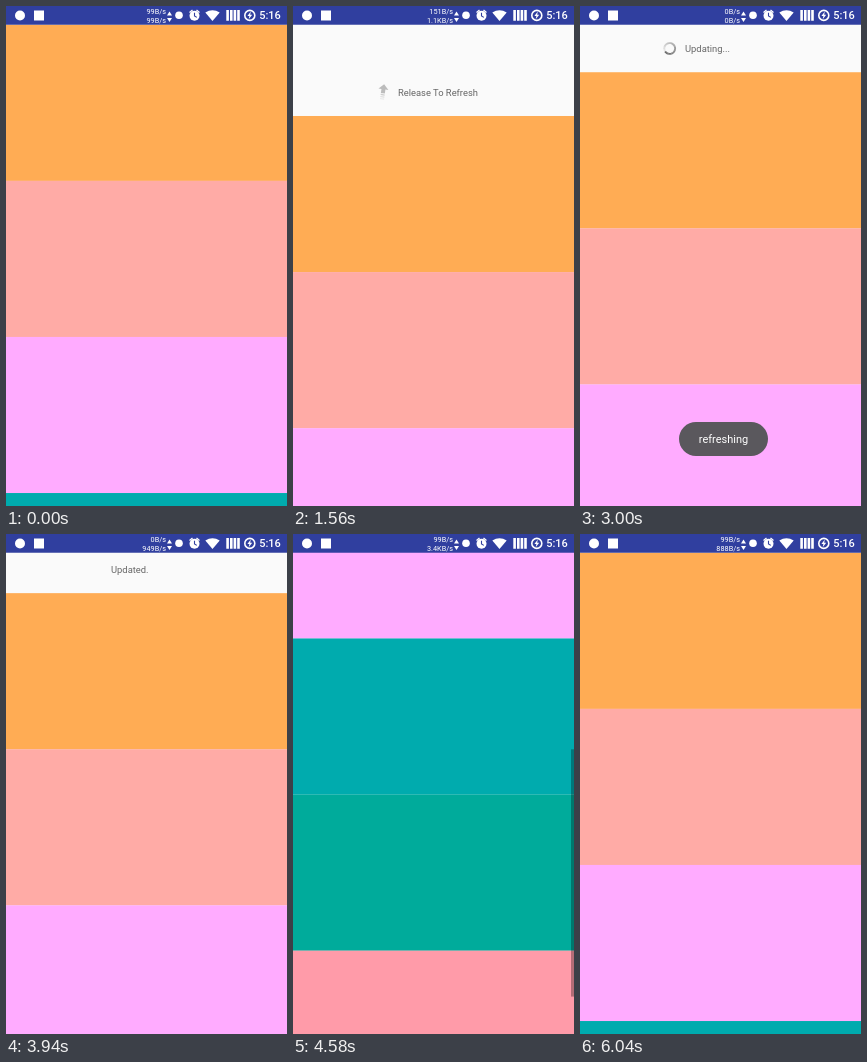
These frames come from a looping animation (281 by 500 pixels, 6.06 s). An HTML page:

```html
<!DOCTYPE html>
<html lang="en">
<head>
<meta charset="utf-8">
<title>Pull to refresh</title>
<style>
  html, body { margin: 0; width: 100%; height: 100%; overflow: hidden; background: #fafafa; }
  svg { display: block; width: 281px; height: 500px; font-family: Roboto, sans-serif; }
</style>
</head>
<body>
<svg viewBox="0 0 281 500">
  <g id="bands"></g>

  <g id="header">
    <g id="arrow" fill="#bcbcbc">
      <path d="M0 8L5 3H2V-1H-2V3H-5Z"/>
      <path d="M-2-3.2h4v1.3h-4z" opacity=".7"/>
      <path d="M-2-5.2h4v1.2h-4z" opacity=".45"/>
      <path d="M-2-7.2h4v1.1h-4z" opacity=".25"/>
    </g>
    <g id="spinner" fill="none" stroke="#606060" stroke-width="1.9"></g>
    <text id="label" x="105" y="3.4" font-size="9.4" fill="#666"></text>
  </g>

  <rect id="thumb" x="278" width="3" height="247.3"/>

  <g id="toast">
    <rect x="99" y="416" width="89" height="34" rx="17" fill="#5a585d"/>
    <text x="143.5" y="437.3" font-size="11" text-anchor="middle" fill="#fff">refreshing</text>
  </g>

  <rect width="281" height="18.73" fill="#303f9f"/>
  <g fill="#fff">
    <circle cx="14" cy="9.5" r="5"/>
    <rect x="28" y="4.5" width="10" height="10"/>
    <g font-size="7.3" text-anchor="end">
      <text id="up" x="160" y="8.3"></text>
      <text id="down" x="160" y="17.2"></text>
    </g>
    <path d="M161 9.5L163.5 5.5L166 9.5ZM161 12L163.5 16L166 12Z"/>
    <circle cx="173" cy="9.3" r="3.8"/>
    <circle cx="188.5" cy="9.8" r="5"/>
    <path d="M183.5 6.5l3-2.5M193.5 6.5l-3-2.5" stroke="#fff" stroke-width="1.3"/>
    <path d="M188.5 6.8v3.2l2.3 1.4" fill="none" stroke="#303f9f" stroke-width="1.1"/>
    <path d="M199.3 6.6Q206.5 1.8 213.7 6.6L206.5 15Z"/>
    <path d="M220.3 4h2.6v10.8h-2.6zM224 4h2.6v10.8h-2.6zM227.6 4h2.6v10.8h-2.6zM231.2 4h2.6v10.8h-2.6z"/>
    <circle cx="243.8" cy="9.4" r="5" fill="none" stroke="#fff" stroke-width="1.6"/>
    <path d="M244.8 5.6L241.4 10h2l-.7 3.3L246.2 8.8h-2z"/>
    <text x="253.2" y="13.4" font-size="11" font-weight="500">5:16</text>
  </g>
</svg>
<script>
const LOOP = 6060, TOP = 18.73, BAND = 156.1, HEADER = 47.5, VIEW = 500 - TOP;
const RELEASE = 1840, DONE = 3910, READY = HEADER * 1.2;
const COLORS = ['#ffac54', '#ffaba6', '#ffabff', '#00abae', '#00ab9b', '#ff9ba9'];
const PULL = [[1180, 0], [1300, 22], [1560, 91], [1700, 126], [1800, 143], [RELEASE, 145]];
const SCROLL = [[4350, 0], [4420, 75], [4580, 381.5], [4660, 440], [4730, 456], [4770, 456],
  [4860, 395], [5020, 167], [5140, 65], [5300, 15], [5520, 0]];
const TRAFFIC = [[0, '99B/s', '99B/s'], [380, '0B/s', '0B/s'], [1400, '151B/s', '1.1KB/s'],
  [2600, '0B/s', '0B/s'], [3700, '0B/s', '949B/s'], [4400, '99B/s', '3.4KB/s'],
  [5400, '0B/s', '0B/s'], [6030, '99B/s', '888B/s']];

const $ = id => document.getElementById(id);
const clamp = x => Math.min(1, Math.max(0, x));
const set = (id, name, value) => $(id).setAttribute(name, value);
const shape = (parent, tag, attrs) => {
  const el = document.createElementNS('http://www.w3.org/2000/svg', tag);
  for (const k in attrs) el.setAttribute(k, attrs[k]);
  $(parent).append(el);
};

COLORS.forEach((fill, i) => shape('bands', 'rect', { y: i * BAND, width: 281, height: BAND + .1, fill }));

// Ring of short arcs, growing darker clockwise
for (let i = 0; i < 24; i++) {
  const point = a => `${5.4 * Math.cos(a)} ${5.4 * Math.sin(a)}`;
  const a = i * Math.PI / 12;
  shape('spinner', 'path', { d: `M${point(a)}A5.4 5.4 0 0 1 ${point(a + .27)}`, opacity: .1 + .9 * i / 23 });
}

// Monotone cubic curve through [time, value] keys
function curve(keys, t) {
  const last = keys.length - 1;
  if (t <= keys[0][0]) return keys[0][1];
  if (t >= keys[last][0]) return keys[last][1];
  const i = keys.findIndex(k => k[0] > t) - 1;
  const slope = j => (keys[j + 1][1] - keys[j][1]) / (keys[j + 1][0] - keys[j][0]);
  const tangent = j => {
    if (j === 0 || j === last) return 0;
    const a = slope(j - 1), b = slope(j);
    return a * b > 0 ? 2 * a * b / (a + b) : 0;
  };
  const [t0, v0] = keys[i], [t1, v1] = keys[i + 1], d = t1 - t0, u = (t - t0) / d, w = 1 - u;
  return v0 * (1 + 2 * u) * w * w + v1 * u * u * (3 - 2 * u)
    + d * u * w * (w * tangent(i) - u * tangent(i + 1));
}

// Fluid-like scroll easing
function fluid(p) {
  const raw = x => x < 1 ? x - 1 + Math.exp(-x) : 1 - (1 - 1 / Math.E) * Math.exp(1 - x);
  return raw(8 * clamp(p)) / raw(8);
}

function pullAt(t) {
  if (t < RELEASE) return curve(PULL, t);
  if (t < DONE) return 145 + (HEADER - 145) * fluid((t - RELEASE) / 200);
  return HEADER * (1 - fluid((t - DONE - 16) / 200));
}

const readyAt = (() => {
  let t = PULL[0][0];
  while (pullAt(t) < READY) t++;
  return t;
})();

function draw(t) {
  const pull = pullAt(t), scroll = curve(SCROLL, t);
  set('bands', 'transform', `translate(0 ${TOP + pull - scroll})`);
  set('header', 'transform', `translate(0 ${TOP + pull - HEADER / 2})`);

  const loading = t >= RELEASE && t < DONE;
  $('label').textContent = t < readyAt ? 'Pull Down' : t < RELEASE ? 'Release To Refresh'
    : loading ? 'Updating...' : 'Updated.';
  set('arrow', 'opacity', t < RELEASE ? 1 : 0);
  set('arrow', 'transform', `translate(90 0) rotate(${-180 * clamp((t - readyAt) / 130)})`);
  set('spinner', 'opacity', loading ? 1 : 0);
  set('spinner', 'transform', `translate(89.7 0) rotate(${(t - 1980) * .3 + 200})`);

  const fadeIn = 1 - (1 - clamp((t - 1900) / 500)) ** 2;
  const fadeOut = clamp((t - 3560) / 340) ** 2;
  set('toast', 'opacity', fadeIn * (1 - fadeOut));

  set('thumb', 'y', TOP + scroll * VIEW / (BAND * COLORS.length));
  set('thumb', 'opacity', t < 4355 ? 0 : .3 * (1 - clamp((t - 5500) / 225)));

  const [, up, down] = TRAFFIC.filter(row => row[0] <= t).pop();
  $('up').textContent = up;
  $('down').textContent = down;
}

function tick() {
  draw(performance.now() % LOOP);
  requestAnimationFrame(tick);
}
tick();
</script>
</body>
</html>
```
